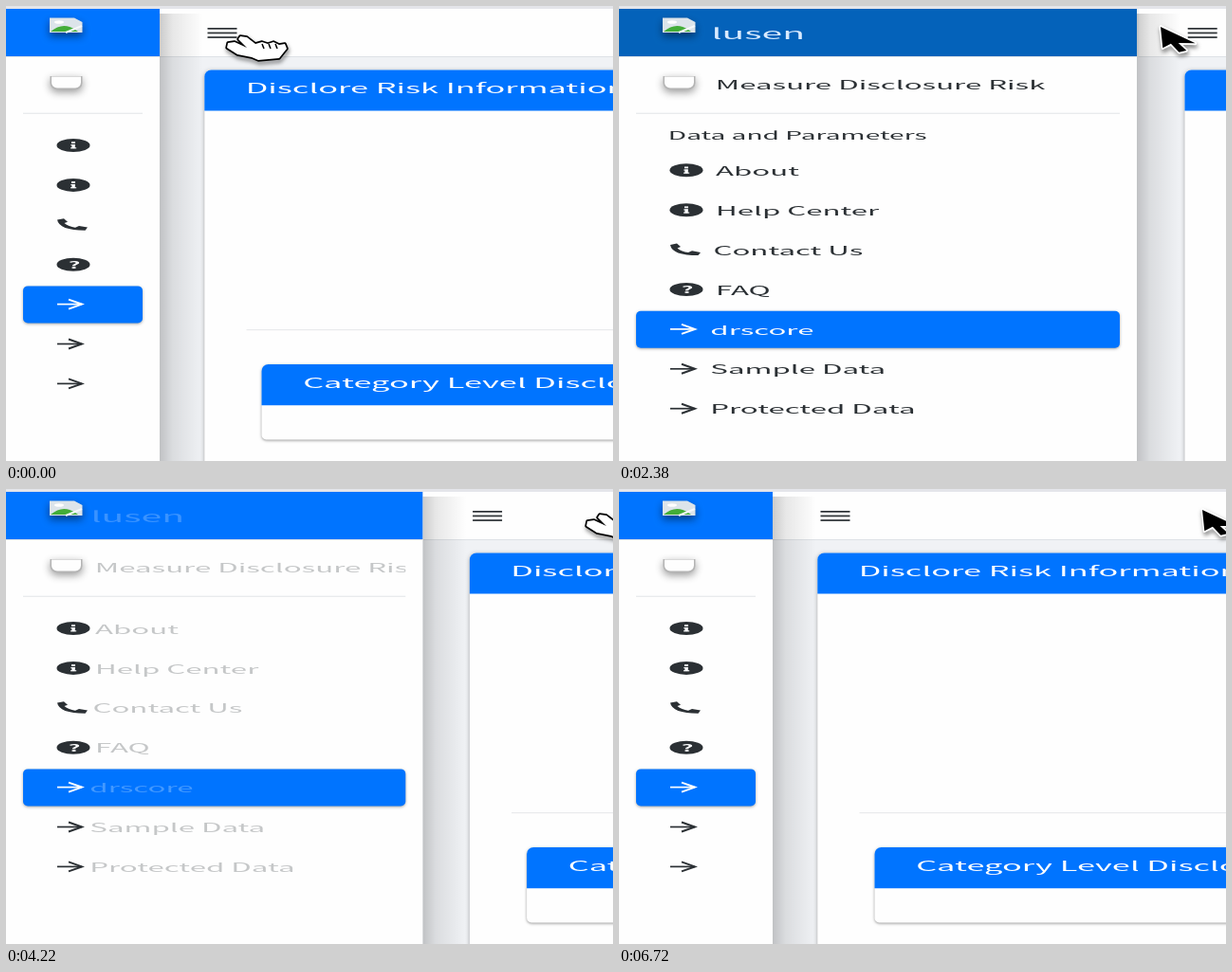
Recreate the animation shown at these times as an HTML page with a canvas. Size 640 px wide and 480 px high, loop 6.74 s.

```html
<!DOCTYPE html>
<html lang="en">
<head>
<meta charset="utf-8">
<title>Collapsible sidebar</title>
<style>
html, body { margin: 0; width: 100%; height: 100%; overflow: hidden; background: #fefefe; }
canvas { display: block; width: 640px; height: 480px; }
</style>
</head>
<body>
<canvas id="stage" width="640" height="480"></canvas>
<script>
const ctx = document.getElementById('stage').getContext('2d');
const LOOP = 6740;
// The page is shown in a squeezed aspect ratio.
const SX = 2.184, SY = 0.877;
const SIDEBAR = [162, 546], CONTENT = [160.5, 547.7];
const BLUE = '#0074ff', PAPER = '#fefefe', INK = '#2b3034', PALE = '#fdfeff';
const FONT = '"Noto Sans CJK JP", "Noto Sans CJK SC", "Noto Sans CJK", "Noto Sans", sans-serif';
const ROWS = [
  ['info', 'About', 102], ['info', 'Help Center', 102], ['phone', 'Contact Us', 99.5],
  ['help', 'FAQ', 102], ['arrow', 'drscore', 96.3], ['arrow', 'Sample Data', 96.3],
  ['arrow', 'Protected Data', 96.3]
];
const ARROW = [[0, 0], [3, 25], [14, 20], [25, 30], [35, 28], [24, 19], [47, 19.5]];
const HAND = [[15, 7], [22, 8], [31, 15], [38, 13], [44, 15], [50, 13], [56, 16], [62, 15], [64, 20],
  [56, 30], [34, 32], [27, 29], [12, 26], [1, 19], [2, 14], [9, 13], [22, 19], [13, 10]];

const clamp = v => Math.max(0, Math.min(1, v));
const mix = (a, b, p) => a + (b - a) * p;
const smooth = p => p * p * (3 - 2 * p);

function bezier(x1, y1, x2, y2) {
  const at = (a, b, u) => 3 * a * u * (1 - u) ** 2 + 3 * b * u * u * (1 - u) + u ** 3;
  return x => {
    let lo = 0, hi = 1;
    for (let i = 0; i < 24; i++) {
      const mid = (lo + hi) / 2;
      if (at(x1, x2, mid) < x) lo = mid; else hi = mid;
    }
    return at(y1, y2, lo);
  };
}
const easeInOut = bezier(0.42, 0, 0.58, 1);
const ease = bezier(0.25, 0.1, 0.25, 1);

// Steps are held for 20, 20 and 100 ms in turn.
function stepAt(ms) {
  const u = ms + 20, phase = u % 140;
  return 3 * Math.floor(u / 140) + (phase < 20 ? 0 : phase < 40 ? 1 : 2);
}

function rect(x, y, w, h, color) {
  ctx.fillStyle = color;
  ctx.fillRect(x, y, w, h);
}

function panel(x, y, w, h, radii, color) {
  ctx.beginPath();
  ctx.roundRect(x, y, w, h, radii);
  ctx.fillStyle = color;
  ctx.fill();
}

function shadow(color, blur, dx = 0, dy = 0) {
  ctx.shadowColor = color;
  ctx.shadowBlur = blur;
  ctx.shadowOffsetX = dx;
  ctx.shadowOffsetY = dy;
}

function text(str, x, y, size, color, weight = 400) {
  ctx.save();
  ctx.translate(x, y);
  ctx.scale(SX, SY);
  ctx.font = `${weight} ${size}px ${FONT}`;
  ctx.fillStyle = color;
  ctx.fillText(str, 0, 0);
  ctx.restore();
}

function stroke(points, color, width) {
  ctx.beginPath();
  points.forEach(([x, y]) => ctx.lineTo(x, y));
  ctx.strokeStyle = color;
  ctx.lineWidth = width;
  ctx.stroke();
}

function disc(y) {
  ctx.beginPath();
  ctx.ellipse(71, y, 17.5, 7, 0, 0, 7);
  ctx.fillStyle = INK;
  ctx.fill();
}

const icons = {
  info(y) {
    disc(y);
    rect(69, y - 3.8, 4, 1.8, PALE);
    rect(68.3, y - 0.8, 4.5, 1.1, PALE);
    rect(69.4, y - 0.8, 3.4, 4, PALE);
    rect(68, y + 2.3, 6.2, 1.1, PALE);
  },
  help(y) {
    disc(y);
    text('?', 65.6, y + 4.1, 11.5, PALE, 700);
  },
  phone(y) {
    ctx.save();
    ctx.translate(54, y - 7);
    ctx.beginPath();
    ctx.moveTo(0, 1.8);
    ctx.lineTo(7, 0.4);
    ctx.lineTo(11, 4);
    ctx.lineTo(7.5, 5.3);
    ctx.quadraticCurveTo(12, 9, 19, 10);
    ctx.lineTo(23, 8.2);
    ctx.lineTo(32, 9.8);
    ctx.lineTo(29.5, 13);
    ctx.quadraticCurveTo(2, 13, 0, 1.8);
    ctx.fillStyle = INK;
    ctx.fill();
    ctx.restore();
  },
  arrow(y, color) {
    stroke([[54, y], [80, y]], color, 1.7);
    stroke([[66, y - 5], [80, y], [66, y + 5]], color, 2);
  }
};

function brokenImage() {
  ctx.save();
  shadow('rgba(0,25,50,.6)', 8, 0, 4);
  ctx.beginPath();
  [[46, 12.5], [72, 12.5], [80.5, 17], [80.5, 28], [46, 28]].forEach(([x, y]) => ctx.lineTo(x, y));
  ctx.fillStyle = '#dce4ea';
  ctx.fill();
  ctx.restore();
  ctx.beginPath();
  ctx.moveTo(47, 27);
  ctx.quadraticCurveTo(60, 16, 73, 25);
  ctx.lineTo(76, 27);
  ctx.fillStyle = '#43ad38';
  ctx.fill();
  ctx.beginPath();
  ctx.ellipse(56, 17, 5, 1.8, 0, 0, 7);
  ctx.fillStyle = PAPER;
  ctx.fill();
  stroke([[63, 28], [80, 21]], '#f4f7fa', 2);
}

function avatar() {
  ctx.save();
  shadow('rgba(50,50,50,.5)', 8, 0, 3);
  panel(46.5, 74, 34, 14, [0, 0, 7, 7], '#b4b4b4');
  ctx.restore();
  panel(48, 74.5, 31, 12, [0, 0, 6, 6], PAPER);
}

function content(x0) {
  rect(0, 0, 640, 480, '#f0f2f5');
  rect(x0, 3, 640, 50, PAPER);
  rect(x0, 53, 640, 1, '#dee2e6');
  for (const y of [23, 27.6, 32.2]) rect(x0 + 52, y, 31, 1.7, INK);

  const x = x0 + 48.8;
  ctx.save();
  shadow('rgba(0,0,0,.35)', 4, 0, 1);
  panel(x, 67.5, 900, 500, [7, 0, 0, 0], PAPER);
  ctx.restore();
  panel(x, 67.5, 900, 43, [7, 0, 0, 0], BLUE);
  text('Disclore Risk Information', x0 + 92.2, 92.3, 15.74, PALE);
  rect(x0 + 93, 341, 640, 1.2, '#e9eaec');

  ctx.save();
  shadow('rgba(0,0,0,.4)', 3, 0, 1);
  panel(x0 + 109, 378, 800, 79.5, [7, 0, 0, 5], PAPER);
  ctx.restore();
  panel(x0 + 109, 378, 800, 43.2, [7, 0, 0, 0], BLUE);
  text('Category Level Disclosure Risk', x0 + 152.7, 402.7, 15.74, PALE);
}

function sideShadow(w) {
  const g = ctx.createLinearGradient(w, 0, w + 46, 0);
  g.addColorStop(0, 'rgba(0,0,0,.2)');
  g.addColorStop(0.3, 'rgba(0,0,0,.09)');
  g.addColorStop(1, 'rgba(0,0,0,0)');
  rect(w, 8, 46, 472, g);
}

function sidebar(s) {
  const w = s.width;
  sideShadow(w);
  rect(0, 3, w, 477, PAPER);
  const bar = [[0, 4], [116, 98], [255, 186]].map(([a, b]) => Math.round(mix(a, b, s.hover)));
  rect(0, 3, w, 50, `rgb(${bar})`);
  rect(0, 53, w, 1, '#dee2e6');
  brokenImage();
  avatar();
  rect(18, 112.7, w - 36, 1, '#e2e4e7');

  const lift = s.headed ? 26.3 : 0;
  const edge = w - 18;
  ctx.save();
  shadow('rgba(0,0,0,.35)', 3, 0, 1);
  panel(18, 295.4 + lift, edge - 18, 39, 5, BLUE);
  ctx.restore();
  ROWS.forEach(([icon], i) => icons[icon](147 + 41.9 * i + lift, i === 4 ? PALE : INK));

  ctx.save();
  ctx.beginPath();
  ctx.rect(0, 0, edge, 480);
  ctx.clip();
  if (s.headed) text('Data and Parameters', 51.8, 140.6, 12.88, INK);
  ctx.globalAlpha = s.fade;
  text('lusen', 97.5 + s.shift, 34.5, 17.9, '#d9eaff', 300);
  text('Measure Disclosure Risk', 101.8 + s.shift, 88.4, 14.3, INK);
  ROWS.forEach(([, label, x], i) =>
    text(label, x + s.shift, 152.6 + 41.9 * i + lift, 14.3, i === 4 ? PALE : INK));
  ctx.restore();
}

function outline(points, fill, line, width) {
  ctx.beginPath();
  points.forEach(([x, y]) => ctx.lineTo(x, y));
  ctx.closePath();
  ctx.lineJoin = 'round';
  ctx.strokeStyle = line;
  ctx.lineWidth = width;
  ctx.save();
  shadow('rgba(0,0,0,.5)', 4, 1, 3);
  ctx.stroke();
  ctx.restore();
  ctx.fillStyle = fill;
  ctx.fill();
}

function pointer({ x, y, hand, scale }) {
  ctx.save();
  ctx.translate(x, y);
  if (hand) {
    outline(HAND, '#fff', '#000', 3.4);
    for (const fx of [38, 45, 52]) stroke([[fx, 15], [fx + 2, 20]], '#000', 1.5);
  } else {
    ctx.scale(scale, mix(1, scale, 0.5));
    outline(ARROW, '#000', '#fff', 4);
  }
  ctx.restore();
  ctx.lineJoin = 'miter';
}

function cursorAt(k) {
  const sweep = smooth(clamp((k - 34) / 18));
  const settle = 1 - (1 - clamp((k - 52) / 11)) ** 2;
  const drift = smooth(clamp((k - 103) / 12));
  return {
    x: 232 + 339 * sweep + 40 * settle + 4 * drift,
    y: 25 - 3 * sweep - 2 * settle + 2 * drift,
    hand: k < 9 || (k >= 24 && k < 38) || (k >= 58 && k < 103),
    scale: k < 30 ? 1 : 0.78
  };
}

function draw(k) {
  const opening = clamp((k - 6.6) / 23), closing = clamp((k - 83.6) / 23);
  const spread = easeInOut(opening) - easeInOut(closing);
  content(mix(...CONTENT, spread));
  sidebar({
    width: mix(...SIDEBAR, spread),
    headed: opening > 0 && closing === 0,
    shift: -10 * SX * (1 - opening + closing),
    fade: clamp(ease(clamp(opening * 1.8)) - ease(clamp(closing * 1.2))),
    hover: clamp((k - 32) / 4) - clamp((k - 55) / 5)
  });
  rect(0, 0, 640, 3, '#e4e5ea');
  pointer(cursorAt(k));
}

const start = performance.now();
function tick() {
  draw(stepAt((performance.now() - start) % LOOP));
  requestAnimationFrame(tick);
}
tick();
</script>
</body>
</html>
```
